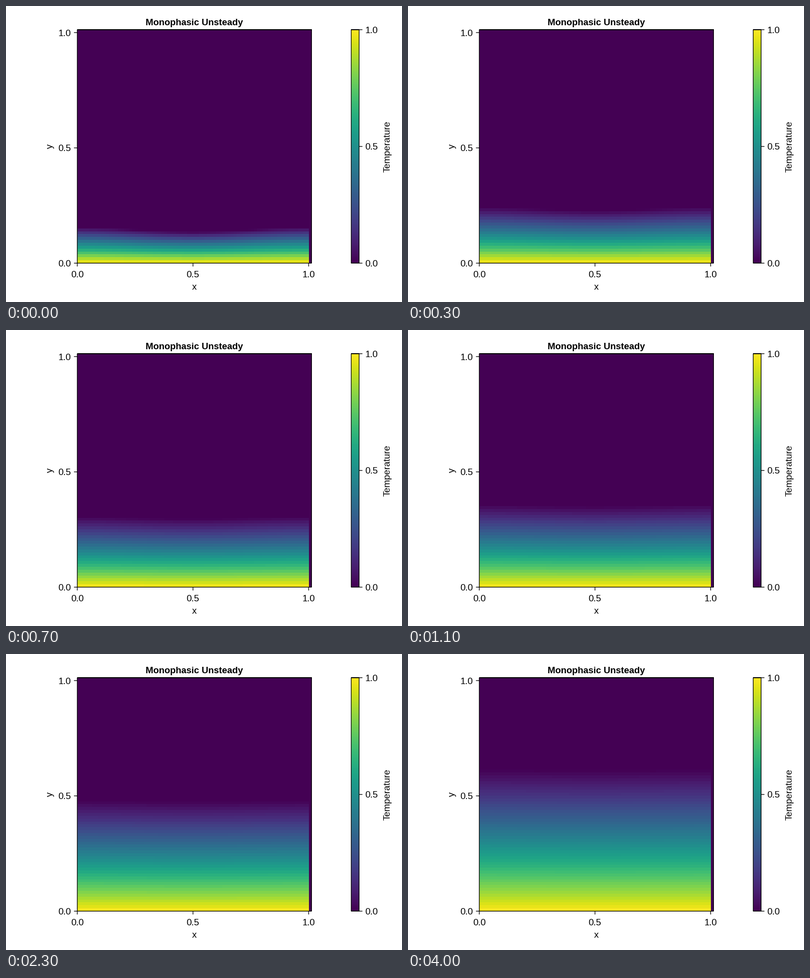
A matplotlib script that plays this animation: 800x600 px, repeating every 4.1 s.

```python
import matplotlib.pyplot as plt
import numpy as np
from math import erf, exp
from matplotlib.animation import FuncAnimation

W, H, DPI = 800, 600, 100
FRAMES, INTERVAL = 41, 100
PX = 72 / DPI                      # points per pixel
FONT = dict(family="Liberation Sans", size=18.67 * PX, color="black")
LEFT, RIGHT, TOP, BOTTOM = 144, 617.3, 48, 521.3
BAR_LEFT, BAR_RIGHT = 697.4, 713.4
CELLS = 81                         # 80 per unit length plus one empty cell
UNIT = (RIGHT - LEFT) * 80 / CELLS
LINE = 1.33 * PX

fig = plt.figure(figsize=(W / DPI, H / DPI), dpi=DPI, facecolor="white")
ax = fig.add_axes([0, 0, 1, 1])
ax.axis("off")

centres = (np.arange(CELLS) + 0.5) / 80
verf = np.vectorize(erf)


def temperature(n):
    """Melting-front profile: hot floor, zero above a slowly flattening front."""
    start = exp(-n / 1.5)
    mean = np.sqrt(0.031 + 0.0086 * n - 0.010 * start)
    ripple = 0.0085 * exp(-n / 8) + 0.0015
    front = mean + ripple * np.cos(2 * np.pi * centres)
    lam = 0.62 - 0.4 * start
    eta = np.minimum(centres[:, None] / front[None, :], 1)
    field = 1 - verf(lam * eta) / erf(lam)
    field[-1, :] = 0
    field[:, -1] = 0
    return field


def image(data, x0, x1, **kw):
    return ax.imshow(data, cmap="viridis", vmin=0, vmax=1, origin="lower",
                     extent=(x0, x1, BOTTOM, TOP), aspect="auto", **kw)


def line(xs, ys):
    ax.plot(xs, ys, color="black", lw=LINE, snap=False,
            solid_capstyle="butt", solid_joinstyle="miter")


def box(x0, x1):
    line([x0, x1, x1, x0, x0, x1], [TOP, TOP, BOTTOM, BOTTOM, TOP, TOP])


def label(x, y, s, ha="center", **kw):
    ax.text(x, y, s, ha=ha, va="baseline", rotation_mode="anchor", **FONT, **kw)


heat = image(temperature(0), LEFT, RIGHT, interpolation="nearest")
image(np.linspace(0, 1, 474)[:, None], BAR_LEFT, BAR_RIGHT,
      interpolation="nearest")
box(LEFT, RIGHT)
box(BAR_LEFT, BAR_RIGHT)

for v in (0, 0.5, 1):
    s = f"{v:.1f}"
    x, y = LEFT + v * UNIT, BOTTOM - v * UNIT
    bar_y = BOTTOM - v * (BOTTOM - TOP)
    line([x, x], [BOTTOM, BOTTOM + 6.67])
    line([LEFT - 6.67, LEFT], [y, y])
    line([BAR_RIGHT, BAR_RIGHT + 6.67], [bar_y, bar_y])
    label(x, 550, s)
    label(131.5, y + 6.7, s, ha="right")
    label(725.2, bar_y + 6.7, s, ha="left")

label(380.6, 39, "Monophasic Unsteady", weight="bold")
label(380.6, 575, "x")
label(94, 284.7, "y", rotation=90)
label(775.6, 284.7, "Temperature", rotation=90)

ax.set_xlim(0, W)
ax.set_ylim(H, 0)


def update(n):
    heat.set_data(temperature(n))
    return [heat]


anim = FuncAnimation(fig, update, frames=FRAMES, interval=INTERVAL,
                     repeat=True, repeat_delay=0)
plt.show()
```
